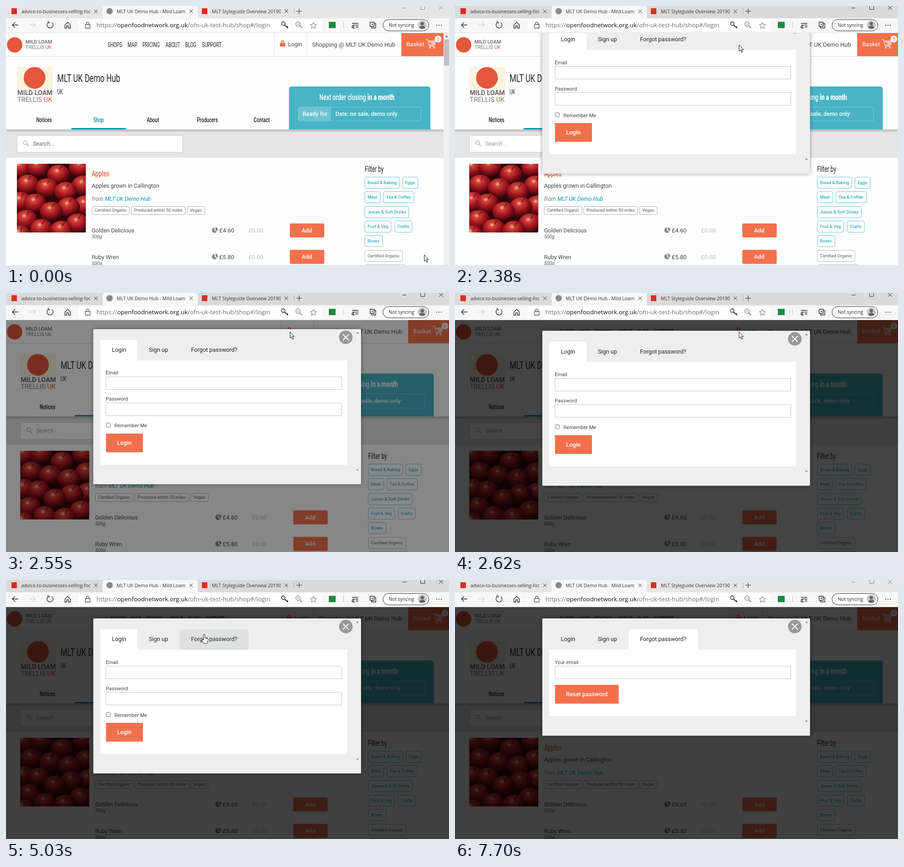
Animation, 977 px wide and 573 px high, one loop 7.78 s. Source, as an HTML page:

```html
<!DOCTYPE html>
<html lang="en">
<head>
<meta charset="utf-8">
<title>Demo hub login</title>
<style>
  html, body { margin: 0; width: 100%; height: 100%; overflow: hidden; background: #fff; }
  svg { display: block; }
  text { font-family: Roboto, sans-serif; white-space: pre; }
  .ui text { font-family: "Open Sans", sans-serif; }
  .line { fill: none; stroke: #222; stroke-width: 1.3; }
  #modal { filter: drop-shadow(0 0 4px rgba(0, 0, 0, .4)); }
</style>
</head>
<body>
<svg id="stage" width="977" height="573" viewBox="0 0 977 573"></svg>
<script>
const LOOP = 7780, ORANGE = '#f4704c', TEAL = '#0096ad', MARK = '#e4573d';

// Drawing helpers
const rect = (x, y, w, h, fill, more = '') =>
  `<rect x="${x}" y="${y}" width="${w}" height="${h}" fill="${fill}" ${more}/>`;
const circle = (x, y, r, fill, more = '') =>
  `<circle cx="${x}" cy="${y}" r="${r}" fill="${fill}" ${more}/>`;
const text = (x, y, s, size = 12.6, fill = '#444', more = '') =>
  `<text x="${x}" y="${y}" font-size="${size}" fill="${fill}" ${more}>${s}</text>`;
const narrow = (x, y, s, size, fill = '#222', more = '') =>
  `<text transform="translate(${x} ${y}) scale(.68 1)" font-size="${size}" fill="${fill}" ${more}>${s}</text>`;
const line = (d, more = '') => `<path class="line" d="${d}" ${more}/>`;
const box = (x, y, w, h, stroke, r = 0, fill = '#fff') =>
  rect(x + .5, y + .5, w, h, fill, `stroke="${stroke}" rx="${r}"`);
const pill = (x, y, w, h, s, stroke, fill) =>
  box(x, y, w, h, stroke, 3.5, 'none') + text(x + 6.5, y + h / 2 + 3.4, s, 9.5, fill);
const button = (x, y, w, h, s, inset, r = 0) =>
  rect(x, y, w, h, ORANGE, `rx="${r}"`) +
  text(x + inset, y + h / 2 + 4.3, s, 12.8, '#fff', 'font-weight="500"');
const group = (id, s, more = '') => `<g id="${id}" ${more}>${s}</g>`;
const italic = 'font-style="italic"';

function apples() {
  const spots = [[8, 10], [46, 8], [140, 8], [92, 24], [24, 46], [146, 48], [66, 54],
    [8, 84], [108, 62], [40, 88], [150, 92], [114, 96], [76, 106],
    [20, 124], [134, 132], [54, 144], [98, 148], [6, 158]];
  return `<svg x="24" y="349" width="152" height="152">${rect(0, 0, 152, 152, '#2e060a')}` +
    spots.map(([x, y]) => `<ellipse cx="${x}" cy="${y}" rx="25" ry="22" fill="url(#apple)"/>` +
      `<path d="M${x + 2} ${y - 10}q2-6 6-8" fill="none" stroke="#3c2412" stroke-width="1.8"/>`).join('') + '</svg>';
}

const product = (y, name, price) =>
  text(189, y, name) + text(189, y + 13, '500g', 10.6, '#555', italic) +
  `<path d="M460 ${y - 5}V${y - 11}a6 6 0 1 0 4.8 9.8z" fill="#888"/>` +
  `<path d="M462 ${y - 6}v-6a6 6 0 0 1 4 9.5z" fill="#888"/>` +
  text(470.5, y, price, 13) + text(535, y, '£0.00', 12.8, '#bbb') +
  button(626, y - 20, 76, 31, 'Add', 26, 3);

const filters = [
  [791, 378, 76, 'Bread &amp; Baking'], [874, 378, 34, 'Eggs'], [791, 410, 34, 'Meat'],
  [832, 410, 67, 'Tea &amp; Coffee'], [791, 443, 97, 'Juices &amp; Soft Drinks'],
  [791, 475, 58, 'Fruit &amp; Veg'], [857, 475, 38, 'Crafts'], [791, 507, 39, 'Boxes']];
const sections = ['Notices', 'Shop', 'About', 'Producers', 'Contact'];
const menu = [[224, 'SHOPS'], [268, 'MAP'], [301, 'PRICING'], [352, 'ABOUT'], [395, 'BLOG'], [432, 'SUPPORT']];

const header =
  circle(19, 86, 17, MARK) +
  text(43, 83, 'MILD LOAM', 11, '#666', 'font-weight="500"') +
  text(43, 95, `TRELLIS <tspan fill="${MARK}">UK</tspan>`, 11, '#777') +
  rect(0, 111, 977, 1, '#ddd') +
  group('menu', menu.map(([x, s]) => narrow(x, 91, s, 14.6)).join('')) +
  group('account',
    rect(592, 60, 1, 51, '#ddd') + rect(663, 60, 1, 51, '#ddd') +
    rect(604, 82, 12, 8, ORANGE, 'rx="1"') +
    line('M607 82v-2a3 3 0 0 1 6 0v2', `style="stroke:${ORANGE};stroke-width:1.8"`) +
    text(622, 89, 'Login', 12.8, '#444', 'id="login"') +
    text(675, 90, 'Shopping @ MLT UK Demo Hub', 13.2) +
    rect(872, 60, 93, 51, ORANGE) + text(883, 89, 'Basket', 13, '#fff') +
    `<g opacity=".6"><path d="M926 74h4l4 15h12M931 77h17l-2 9h-13z" fill="#fff" stroke="#fff" stroke-width="1.6"/>` +
    circle(935, 92, 2.2, '#fff') + circle(944, 92, 2.2, '#fff') + '</g>' +
    circle(953, 73, 7.5, '#fff') + text(950.2, 76.6, '0', 10, ORANGE));

const content =
  rect(24, 135, 79, 50, '#faf4df') + circle(63, 159, 24, MARK) +
  text(25, 197, 'MILD LOAM', 14.5, '#666', 'font-weight="700"') +
  text(25, 212, `TRELLIS <tspan fill="${MARK}">UK</tspan>`, 14.7, '#777') +
  narrow(113, 168, 'MLT UK Demo Hub', 24.5) + narrow(113, 195, 'UK', 14) +
  sections.map((s, i) => narrow(84 + i * 120, 257, s, 14.8, i === 1 ? TEAL : '#222',
    'text-anchor="middle" font-weight="500"')).join('') +
  rect(144, 270, 121, 3, TEAL) +
  '<path d="M624 274V184q0-6 6-6H930q6 0 6 6V274z" fill="#48b4c6"/>' +
  narrow(691, 208, 'Next order closing <tspan font-weight="800">in a month</tspan>', 18.5, '#fff', 'font-weight="500"') +
  box(644, 223, 271, 31, '#7ccbd7', 2, 'none') + rect(645, 224, 72, 30, '#6dc3d1') +
  text(654, 243, 'Ready for', 12.8, '#fff', 'font-weight="500"') +
  text(726.5, 243, 'Date: no sale, demo only', 12.5, '#fff', 'font-weight="500"') +
  box(24, 286, 365, 37, '#ccc', 3) +
  line('M46 306l4 4', 'style="stroke:#bbb;stroke-width:2"') +
  circle(42.5, 302.5, 4.2, 'none', 'stroke="#bbb" stroke-width="1.8"') +
  text(59, 309, 'Search...', 12.8, '#666', 'id="search" ' + italic) +
  apples() +
  narrow(189, 377, 'Apples', 18.5, '#f0694a', 'font-weight="500"') +
  text(189, 402, 'Apples grown in Callington') +
  text(189, 431, `from <tspan x="218" fill="${TEAL}">MLT UK Demo Hub</tspan>`, 12.5, '#777', italic) +
  pill(189, 443, 83, 18, 'Certified Organic', '#aaa', '#555') +
  pill(276, 443, 119, 18, 'Produced within 50 miles', '#aaa', '#555') +
  pill(399, 443, 39, 18, 'Vegan', '#aaa', '#555') +
  product(501, 'Golden Delicious', '£4.60') + product(559.5, 'Ruby Wren', '£5.80') +
  narrow(791, 367, 'Filter by', 17.5) +
  filters.map(([x, y, w, s]) => pill(x, y, w, 25, s, '#6cc3d0', TEAL)).join('') +
  pill(791, 540, 83, 25, 'Certified Organic', '#bbb', '#555') + box(791, 572, 91, 25, '#bbb', 3.5, 'none');

const page =
  rect(0, 60, 977, 513, '#fefefe') + rect(0, 274, 977, 62, '#e5e5e5') +
  rect(0, 274, 977, 6, 'url(#shade)') + header + group('content', content) + rect(0, 273, 977, 1, '#ccc') +
  group('scrollbar', rect(965, 60, 12, 513, '#f1f1f1') + rect(966, 74, 11, 58, '#c1c1c1') +
    '<path d="M968 69l3.5-4 3.5 4z" fill="#777"/>');

const field = (y, label) => text(220, y - 4.5, label, 11.1) + box(220, y, 520, 28, '#c4c4c4');
const TABS = [[208, 82], [290, 93], [383, 152]];
const modal =
  rect(192.5, 85, 590.5, 343, '#eee', 'id="sheet" rx="2"') +
  rect(290, 109, 93, 46, '#dfe1e0', 'id="hover"') + rect(208, 109, 82, 46, '#fff', 'id="tab"') +
  rect(208, 154, 544, 231, '#fff', 'id="panel"') +
  text(233.5, 135, 'Login', 12.8, '#222') + text(315, 135, 'Sign up', 12.8, '#222') +
  text(408, 135, 'Forgot password?', 12.8, '#222') +
  circle(749.5, 103, 15, '#999') +
  line('M743 96.5l13 13m0-13l-13 13', 'style="stroke:#fff;stroke-width:2"') +
  '<path d="M772 95l3.2-3.5 3.2 3.5z" fill="#888"/>' +
  '<path id="down" d="M772 395l3.2 3.5 3.2-3.5z" fill="#888"/>' +
  group('loginForm', field(190, 'Email') + field(248, 'Password') +
    box(220.5, 292.5, 9, 9, '#666', 1.5) + text(239, 302.5, 'Remember Me', 11.1) +
    button(220.5, 316, 81.5, 41.5, 'Login', 24.5)) +
  group('resetForm', field(190, 'Your email') + button(220.5, 232, 140.5, 41.5, 'Reset password', 24.5));

const browserTab = (x, s) =>
  `<svg x="${x + 24}" y="0" width="152" height="26">${text(0, 15.5, s, 10.4, '#333')}</svg>` +
  line(`M${x + 184.5} 8l7.5 7.5m0-7.5l-7.5 7.5`, 'style="stroke-width:1"');
const star = (x, y) =>
  `M${x} ${y - 7}l2 4.6 5 .5-3.8 3.3 1.1 5-4.3-2.6-4.3 2.6 1.1-5-3.8-3.3 5-.5z`;
const lens = (x, colour) => circle(x, 40, 5, 'none', `stroke="${colour}" stroke-width="1.3"`) +
  line(`M${x + 3.6} 43.6l5.4 5.4`, `style="stroke:${colour};stroke-width:1.8"`);

const browser =
  rect(0, 0, 977, 28, '#e6e6e6', 'id="strip"') +
  '<path d="M213 28V4q0-4 4-4H419q4 0 4 4V28z" fill="#f7f7f7"/>' +
  rect(0, 27, 977, 32, '#f7f7f7') + rect(0, 59, 977, 1, '#e0e0e0') +
  rect(12, 5, 12, 13, '#d8301f') + circle(228.5, 11.5, 7, '#8a8a8a') + rect(432, 5, 12, 13, '#d8301f') +
  browserTab(10, 'advice-to-businesses-selling-food') +
  browserTab(220, 'MLT UK Demo Hub - Mild Loam Trellis') +
  browserTab(430, 'MLT Styleguide Overview 201906') +
  line('M635.5 5v13', 'style="stroke:#aaa;stroke-width:1"') + line('M640.5 11.5h12m-6-6v12', 'style="stroke-width:1"') +
  group('controls', '<path d="M874 4.5h9M914.5 0v7.5h9V0M955 0l4.5 4 4.5-4m-9 8l4.5-4 4.5 4" fill="none" stroke="currentColor"/>') +
  line('M27 42H14m6-6l-6 6 6 6') + line('M52 42h13m-6-6l6 6-6 6', 'style="stroke:#d0d0d0"') +
  line('M101 36.5a6.7 6.7 0 1 1-7.5-.2M93 33v4h4') +
  line('M130 42l6-6 6 6v7h-4v-5h-4v5h-4z') +
  rect(160, 30, 536, 26, '#fff', 'rx="3"') +
  line('M175 41h10.5v8H175zM177.5 41v-2.5a2.8 2.8 0 0 1 5.6 0V41', 'style="stroke:#555"') +
  text(199.5, 47, 'https://<tspan fill="#111">openfoodnetwork.org.uk</tspan>/ofn-uk-test-hub/shop#/login', 13.4, '#6a6a6a') +
  circle(611.5, 39, 4, 'none', 'stroke="#222" stroke-width="1.4"') +
  line('M614 42l7 6v-3', 'style="stroke-width:1.8"') +
  lens(644, '#888') + line('M641.5 40h5', 'style="stroke:#888"') +
  line(star(678, 43), 'style="stroke:#666;stroke-width:1"') +
  rect(712, 35, 15, 14, '#1f8a43') + rect(744, 35, 1, 14, '#bbb') +
  line('M763 38.5h14M770 42.5h7M771 46.5h6M763 48l1-5 4-1-2 4 2 3z') +
  line('M803 36h9v9h-9zM806 45v3.5h9.5V39H812M806 40.5h4') +
  box(831, 29.5, 101, 25, '#222', 13) + text(844, 46, 'Not syncing', 10.3, '#222') +
  circle(918, 42, 10, '#c8c8c8') + circle(918, 39, 3.8, '#666') +
  '<path d="M911.5 48.5a6.5 5 0 0 1 13 0q-6.5 4-13 0z" fill="#666"/>' +
  [950, 955, 960].map(x => circle(x, 42.5, 1.1, '#222')).join('');

const pointer = 'fill="#fff" stroke="#111" stroke-linejoin="round"';
document.getElementById('stage').innerHTML = `<defs>
  <radialGradient id="apple" cx=".42" cy=".3" r=".7">
    <stop offset="0" stop-color="#f3c3a4"/><stop offset=".16" stop-color="#d2453c"/>
    <stop offset=".5" stop-color="#a81820"/><stop offset=".8" stop-color="#5f0a12"/>
    <stop offset="1" stop-color="#26050a"/></radialGradient>
  <linearGradient id="shade" x2="0" y2="1"><stop stop-opacity=".2"/><stop offset="1" stop-opacity="0"/></linearGradient>
  </defs>` + page + rect(0, 60, 977, 513, '#000', 'id="overlay"') + group('modal', modal) +
  group('browser', browser, 'class="ui"') +
  group('cursor',
    `<path id="arrow" d="M.5 .5V14.5l3.2-3 2.2 5.4 2.2-1-2.3-5.2H10z" ${pointer}/>` +
    `<path id="hand" d="M-1.7 1.5a1.7 1.7 0 0 1 3.4 0V7l6 1.6q1.4.6 1.2 2.4L8 15l-1.5 4.5H-.8L-5 12.5q-.8-1.8.8-2.2 1.2 0 2.5 1.7z" ${pointer}/>`);

const $ = {};
document.querySelectorAll('[id]').forEach(el => $[el.id] = el);
const set = (el, attrs) => { for (const key in attrs) el.setAttribute(key, attrs[key]); };
const show = (el, on) => el.style.display = on ? '' : 'none';
const shift = (el, x, y = 0) => set(el, { transform: `translate(${x} ${y})` });

// Pointer moves: start, end, number of steps, destination
const MOVES = [[70, 400, 5, 778, 339], [720, 1260, 8, 626, 85.5], [3080, 3820, 10, 331, 126],
  [4130, 4550, 6, 437, 121], [5980, 6600, 9, 862, 564]];

function pointerAt(t) {
  let x = 922, y = 550;
  for (const [start, end, steps, toX, toY] of MOVES) {
    if (t < start) break;
    const step = Math.floor((t - start) / (end - start) * (steps - 1) + .01) + 1;
    const p = Math.min(1, step / steps);
    x += (toX - x) * p;
    y += (toY - y) * p;
  }
  return [x, y];
}

function draw(t) {
  const [x, y] = pointerAt(t);
  const open = t >= 2380, reset = t >= 5240, focused = t >= 2210 && t < 7310;
  const tick = Math.min(4, Math.floor((t - 2380) / 80));
  const over = open && y >= 109 && y < 154 ? TABS.findIndex(([left, w]) => x >= left && x < left + w) : -1;
  const overLogin = !open && x > 592 && x < 663 && y < 111;

  set($.strip, { fill: focused ? '#dadada' : '#e6e6e6' });
  $.controls.style.color = focused ? '#222' : '#888';

  // Hiding the page scrollbar widens the layout by 15px
  const wider = open ? 15 : 0;
  shift($.menu, wider / 2);
  shift($.content, wider / 2);
  shift($.account, wider);
  show($.scrollbar, !open);
  set($.login, { fill: overLogin ? ORANGE : '#444' });
  set($.search, { fill: t < 720 ? '#666' : '#999' });

  set($.overlay, { opacity: open ? [0, .08, .47, .73, .75][tick] : 0 });
  show($.modal, open);
  shift($.modal, 0, tick < 4 ? -57 * .297 ** tick : 0);
  const [left, width] = TABS[reset ? 2 : 0];
  set($.tab, { x: left, width });
  show($.hover, over >= 0);
  if (over >= 0) set($.hover, { x: TABS[over][0], width: TABS[over][1] });
  set($.sheet, { height: reset ? 259.5 : 343 });
  set($.panel, { height: reset ? 147 : 231 });
  shift($.down, 0, reset ? -84 : 0);
  show($.loginForm, !reset);
  show($.resetForm, reset);

  const hand = over >= 0 || overLogin;
  show($.hand, hand);
  show($.arrow, !hand);
  show($.cursor, t < 6850);
  shift($.cursor, x, y);
}

function frame() {
  draw(performance.now() % LOOP);
  requestAnimationFrame(frame);
}
frame();
</script>
</body>
</html>
```
